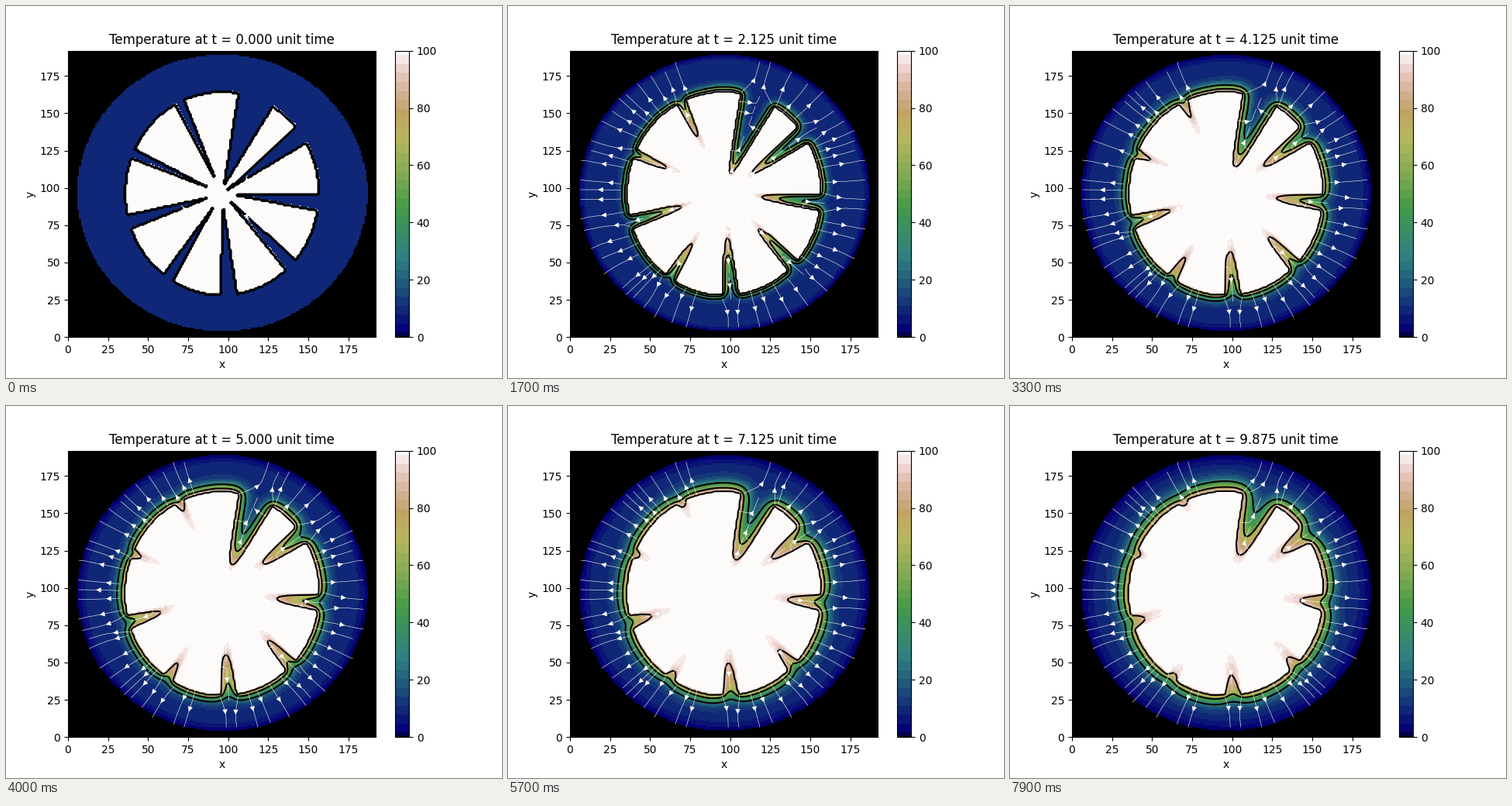
These frames come from a looping animation (640 by 480 pixels, 8000 ms). A matplotlib script:

```python
import matplotlib.pyplot as plt
import numpy as np
from matplotlib.animation import FuncAnimation
from matplotlib.colors import ListedColormap
from matplotlib.path import Path

N, STEPS = 192, 80
ALPHA, DX = 2, 1
DT = DX**2 / (4 * ALPHA)
GAMMA = ALPHA * DT / DX**2
COLD, HOT = 10.0, 100.0

# Cold notches cut into the hot disc: tip, then the two rim corners
NOTCHES = np.array([
    [(92.4, 104.5), (66.8, 155.4), (72.6, 158.5)],
    [(97.5, 101.9), (106.5, 163.2), (127.7, 154.4)],
    [(99.7, 98.8), (142.3, 140.4), (148.5, 130.0)],
    [(102.6, 95.7), (156.3, 95.7), (155.3, 84.8)],
    [(101.6, 90.5), (142.3, 51.5), (136.0, 44.8)],
    [(96.8, 86.9), (105.5, 28.2), (95.3, 27.6)],
    [(90.5, 86.9), (65.3, 37.0), (59.5, 41.7)],
    [(88.1, 93.6), (39.7, 72.8), (37.3, 81.7)],
    [(87.1, 100.4), (40.2, 119.6), (41.6, 125.8)],
])

axis = np.arange(N)
X, Y = np.meshgrid(axis, axis)


def ellipse(cx, cy, rx, ry):
    return ((X - cx) / rx) ** 2 + ((Y - cy) / ry) ** 2 <= 1


def wedge(tip, a, b, stretch=1.3):
    corners = [tip, tip + stretch * (a - tip), tip + stretch * (b - tip)]
    points = np.column_stack([X.ravel(), Y.ravel()])
    return Path(corners).contains_points(points).reshape(X.shape)


def solve():
    """Explicit heat equation with the hot disc and the outside held fixed."""
    plate = ellipse(95.8, 95.9, 90.5, 92.7)
    hot = ellipse(96.2, 96.2, 60.5, 68.2)
    for notch in NOTCHES:
        hot &= ~wedge(*notch)
    free = plate & ~hot
    u = np.where(hot, HOT, np.where(plate, COLD, 0.0))
    fields = [u]
    for _ in range(STEPS - 1):
        around = sum(np.roll(u, s, ax) for s in (1, -1) for ax in (0, 1))
        u = np.where(free, u + GAMMA * (around - 4 * u), u)
        fields.append(u)
    return fields


def banded(name, bands=32):
    v = np.linspace(0, 1, 256)
    q = np.round(v * bands) / bands
    return ListedColormap(plt.get_cmap(name)(np.where(v > 0, np.maximum(q, 0.015), 0)))


fields = solve()
fig, ax = plt.subplots(figsize=(6.4, 4.8), dpi=100)
image = ax.imshow(fields[0], cmap=banded("gist_earth"), vmin=0, vmax=100,
                  origin="lower", extent=(0, N, 0, N), aspect="auto",
                  interpolation="nearest")
fig.colorbar(image, ax=ax)
ax.set(xlabel="x", ylabel="y", xlim=(0, N), ylim=(0, N))
ax.set_autoscale_on(False)
title = ax.set_title("")


def clear():
    for artist in list(ax.collections) + list(ax.patches):
        artist.remove()


def draw(k):
    clear()
    u = fields[k]
    image.set_data(u)
    title.set_text(f"Temperature at t = {k * DT:.3f} unit time")
    ax.contour(X, Y, u, levels=[30, 60, 90], colors="black", linewidths=1.5)
    gy, gx = np.gradient(u)
    ax.streamplot(axis, axis, -gx, -gy, color="white", linewidth=0.4)
    ax.set(xlim=(0, N), ylim=(0, N))


anim = FuncAnimation(fig, draw, frames=STEPS, interval=100,
                     init_func=clear, repeat=True, repeat_delay=0)
plt.show()
```
